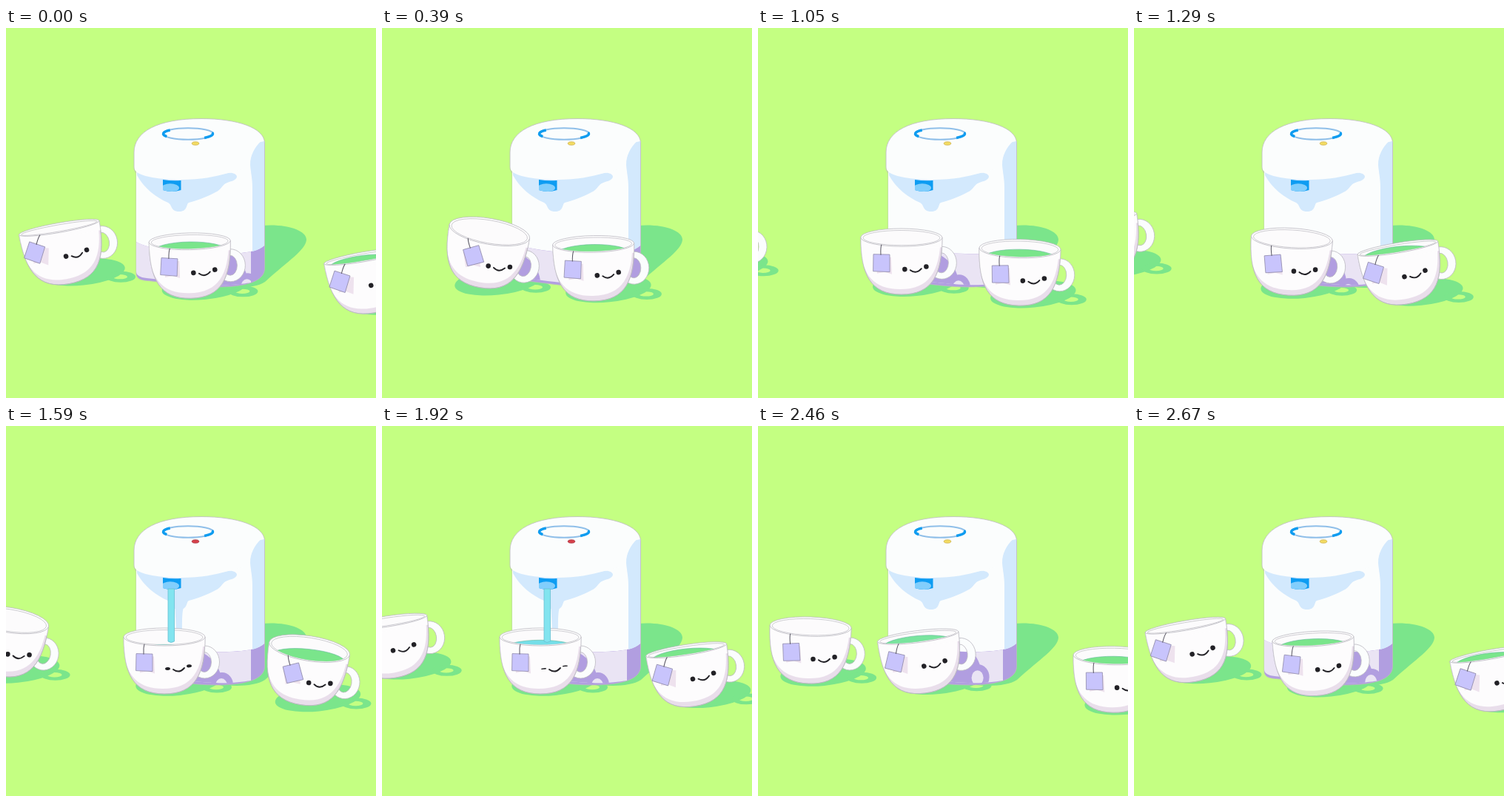
Write an HTML page with a canvas that moves like this. It is 500 by 500 pixels and loops after 2700 ms.

```html
<!DOCTYPE html>
<html lang="en">
<head>
<meta charset="utf-8">
<title>Tea cups</title>
<style>
  html, body { margin: 0; width: 100%; height: 100%; overflow: hidden; background: #c4ff82; }
  canvas { display: block; width: 500px; height: 500px; }
</style>
</head>
<body>
<canvas id="stage"></canvas>
<script>
const LOOP = 2700, STEP = 30, POUR = [1440, 2100];
const BG = '#c4ff82', SHADOW = '#7be58b', WHITE = '#fbfdfd', PALE = '#d3e9fd',
  LILAC = '#eae4f4', PURPLE = '#b19ee0', LINE = '#bbb9c1', INK = '#222126';

const canvas = document.getElementById('stage');
const c = canvas.getContext('2d');
const ratio = window.devicePixelRatio || 1;
canvas.width = canvas.height = 500 * ratio;

// A cup's whole trip, as [ms, value]; each cup is one loop ahead of the next.
const ROUTE = [[0, -175], [810, -93], [1290, -36], [1920, 21], [2700, 89], [3090, 132],
  [3510, 174], [3900, 206], [4200, 214], [5005, 214], [5400, 250], [5790, 287.5],
  [6210, 332], [6690, 372.5], [7320, 426], [7650, 461], [8100, 501], [8490, 566], [10800, 900]];
const LEAN = [[0, 9], [550, -9], [900, 9], [1260, -9], [1600, 9], [1950, -9], [2290, 9.5],
  [2690, -10], [3090, 10], [3490, -9], [3900, 4], [4250, 0], [5000, 0], [5230, -9],
  [5600, 9], [5950, -9], [6290, 9], [6650, -10], [7000, 9], [7350, -9], [7680, 9],
  [8080, -10], [8420, 9]];

const clamp = v => Math.min(1, Math.max(0, v));
const mix = (a, b, k) => a + (b - a) * k;
const linear = k => k;
const swing = k => (1 - Math.cos(Math.PI * k)) / 2;

function track(keys, t, ease) {
  const i = keys.findIndex(k => k[0] > t);
  if (i < 0) return keys[keys.length - 1][1];
  const [a, u] = keys[i - 1], [b, v] = keys[i];
  return mix(u, v, ease((t - a) / (b - a)));
}

const shape = d => new Path2D(d);
const oval = (x, y, rx, ry, rot = 0, from = 0, to = 2 * Math.PI) => {
  const p = new Path2D();
  p.ellipse(x, y, rx, ry, rot, from, to);
  return p;
};

function paint(p, fill, stroke, width = 0.8) {
  if (fill) { c.fillStyle = fill; c.fill(p, 'evenodd'); }
  if (stroke) { c.strokeStyle = stroke; c.lineWidth = width; c.stroke(p); }
}

function scoped(draw) {
  c.save();
  draw();
  c.restore();
}

const BODY = shape('M176 185V331C176 337 180 340 187 341C220 344 250 350 284 350C325 350 349.500 342 349.500 325V153Z');
const BAND = shape('M176 289C190 297 220 302 255 304C290 306 312 306 331 302V344C318 346 300 348 284 347C250 346 220 341 190 338C181 337 176 334 176 329Z');
const WALL = shape('M170 150H352V291C347 297 340 300 331 302C300 309 200 304 176 289H170Z');
const SIDE = shape('M352 147C339 156 330 169 330 185C331 197 333 203 333 216V302C341 300 347 297 352 290Z');
const UNDER = shape('M177 195C190 203 250 207 300 196C307 195 312 198 312 201C311 206 304 207 299 209C291 212 292 218 283 222C272 228 256 234 247 236C243 238 246 248 234 248C222 248 225 239 219 236C203 229 187 217 177 199Z');
const HEAD = shape('M173 188V168C173 140 205 122.500 264 122.500C313 122.500 349 135 349.500 155L329 190C315 191 307 195 300 196C283 201 262 205 238 205C205 205 173 200 173 188Z');
const HEAD_EDGE = shape('M176 196C174 194 173 191 173 188V168C173 140 205 122.500 264 122.500C313 122.500 349 135 349.500 155V300');
const FLOOR = shape('M345 267C378 264 406 273 406 286C405 300 382 314 350 343C338 351 315 352 295 350Z');
const CUP = shape('M-55 0C-55 50 -42 77 0 77C42 77 55 50 55 0Z');

function pose(T) {
  const tilt = track(LEAN, T, swing);
  const x = track(ROUTE, T, linear) + tilt / 2;
  return { T, tilt, x, y: 285 + (x - 214) * 0.095 };
}

function groundShadow({ x, y, tilt }) {
  paint(oval(x + 19, y + 61 + tilt * 0.4, 58, 18, -0.1), SHADOW);
  const ring = oval(x + 71, y + 68 + tilt * 0.45, 20, 7.5);
  ring.addPath(oval(x + 70, y + 68 + tilt * 0.45, 10, 3.2));
  paint(ring, SHADOW);
}

function wallShadow({ x, tilt }) {
  const cx = x + 78 + tilt * 0.7, cy = 350 + tilt * 1.5;
  paint(oval(x + 25, 345 + Math.min(0, tilt) * 1.5, 52, 45), PURPLE);
  paint(oval(cx, cy, 15, 17), PURPLE);
  paint(oval(cx - 1, cy + 1, 8, 10), LILAC);
}

function machine(cups, pouring) {
  paint(BODY, PURPLE, LINE);
  scoped(() => {
    c.clip(BODY);
    paint(WALL, WHITE);
    paint(BAND, LILAC);
    c.clip(BAND);
    cups.forEach(wallShadow);
  });
  paint(UNDER, PALE);
  if (pouring) paint(shape('M228 238H243C238 247 238 255 238 276H230Z'), PALE);
  paint(HEAD, WHITE);
  scoped(() => {
    c.clip(BODY);
    paint(SIDE, PALE);
  });
  paint(HEAD_EDGE, null, LINE);

  paint(oval(246, 143, 34, 7.7), null, '#8fbfe9', 2);
  paint(oval(246, 143, 33.5, 7.2, 0, 2.6, 3.9), null, '#0f9cf0', 3.5);
  paint(oval(246, 143, 33.5, 7.2, 0, -0.25, 0.85), null, '#0f9cf0', 3.5);
  paint(oval(256, 156, 4.8, 2.2), pouring ? '#d8414a' : '#f4dc62', pouring ? '#a83c48' : '#cdb155', 0.8);

  scoped(() => {
    const spout = shape('M212 205Q224 207 236.500 206V219Q224 223 212 219Z');
    paint(spout, '#0d9cf2');
    c.clip(spout);
    paint(oval(222, 216, 12, 5.8), '#82cefc');
  });
}

function tea({ T, tilt }, ry) {
  const start = LOOP + POUR[0], end = LOOP + POUR[1];
  if (T < start) return;
  const level = mix(13, 1, clamp((T - start) / (end - start))) + Math.min(0, tilt) * 0.3;
  const k = clamp((T - end) / 450);
  const rgb = [mix(116, 122, k), mix(222, 229, k), mix(232, 139, k)].map(Math.round);
  scoped(() => {
    c.clip(oval(0, 0.5, 52, ry));
    c.rotate(-tilt / 3 * Math.PI / 180);
    paint(oval(0, level + 12, 49, 12), `rgb(${rgb})`, '#63b79a', 0.6);
  });
}

function face(T, tilt) {
  const shut = swing(clamp((T - 4230) / 120)) * (1 - swing(clamp((T - 4800) / 240)));
  scoped(() => {
    c.translate(tilt * 0.2, tilt * 0.33);
    for (const [x, y] of [[4.5, 43], [33.5, 39.3]])
      paint(oval(x, y, 3.3 + shut * 0.4, mix(3.3, 0.8, shut), -0.1), INK);
    c.lineCap = 'round';
    paint(shape('M12 44Q20 50 27 42'), null, INK, 1.9);
  });
}

function tag(tilt, ry) {
  scoped(() => {
    c.translate(-27, ry * 0.8);
    scoped(() => {
      c.rotate(-tilt * 1.4 * Math.PI / 180);
      paint(shape('M-8 17H13L14 40L4 37L-6 39Z'), '#eee2ee');
    });
    c.rotate(-tilt * 2.7 * Math.PI / 180);
    paint(shape('M-11 13L11 13.500L11 37L-11.500 36Z'), '#c8c4fc', '#928dac', 0.8);
    paint(shape('M0 0Q-1.500 4 -1 14'), null, '#555360', 1);
  });
}

function cup(p) {
  const { T, x, y, tilt } = p;
  const ry = 12 + tilt * 0.55;
  scoped(() => {
    c.translate(x + 0.25 * tilt - 0.02 * tilt * tilt, y - 0.035 * tilt * tilt + 45);
    c.rotate(tilt * Math.PI / 180);
    c.translate(0, -45);

    const grip = 34 + tilt * 0.45;
    const handle = oval(54.5, grip, 20, 22);
    handle.addPath(oval(54, grip, 9.5, 13.5));
    paint(handle, WHITE, LINE);

    paint(CUP, '#e9deeb', LINE);
    scoped(() => {
      c.clip(CUP);
      c.translate(-2, -7);
      paint(CUP, '#fdfcfd');
      paint(shape('M-60 -10H60V20H-60Z'), '#fdfcfd');
    });
    paint(CUP, null, LINE, 0.6);

    paint(oval(0, 0, 55, ry), '#fefefe', LINE);
    paint(oval(0, 0.5, 52, ry - 2), '#fcfbfc', LINE, 0.7);
    tea(p, ry - 2);
    tag(tilt, ry);
    face(T, tilt);
  });
}

function stream(y) {
  const p = shape(`M219 220H227.500V${y}Q223 ${y + 3} 219 ${y}Z`);
  paint(p, '#82e4ef', '#69bfd2', 0.8);
}

function draw(now) {
  const t = Math.floor(now % LOOP / STEP) * STEP;
  const pouring = t >= POUR[0] && t < POUR[1];
  const cups = [0, 1, 2, 3].map(i => pose(t + i * LOOP));

  c.setTransform(ratio, 0, 0, ratio, 0, 0);
  c.fillStyle = BG;
  c.fillRect(0, 0, 500, 500);
  paint(FLOOR, SHADOW);
  cups.forEach(groundShadow);
  machine(cups, pouring);
  cups.forEach(cup);
  if (pouring) stream(mix(220, 291, clamp((t - POUR[0] + STEP) / 90)));
}

const begin = performance.now();
function tick() {
  draw(performance.now() - begin);
  requestAnimationFrame(tick);
}
tick();
</script>
</body>
</html>
```
